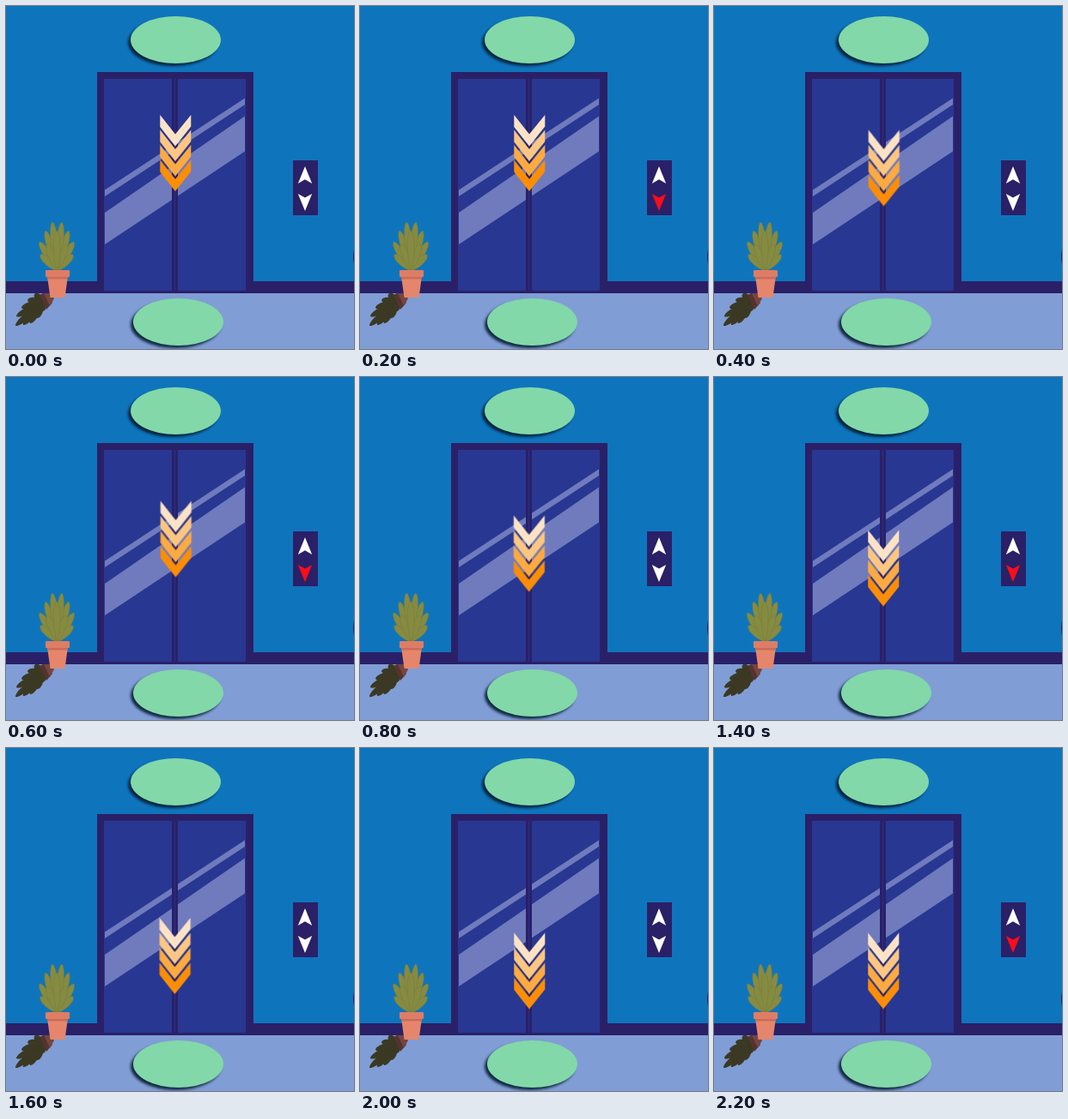
These frames come from a looping animation (405 px wide and 400 px high, 2.4 s). An HTML page:

```html
<!DOCTYPE html>
<html lang="en">
<head>
<meta charset="utf-8">
<title>Elevator going down</title>
<style>
  html, body { margin: 0; width: 100%; height: 100%; overflow: hidden; background: #0e75bd; }
  svg { display: block; width: 405px; height: 400px; }
  .dark { fill: #2a2068; }
  .door { fill: #283791; }
  .shine { fill: #707bbd; }
  .leaf { fill: #868b42; stroke: #74793a; stroke-width: .5; }
  .shade { fill: #3b3923; }
  .disc { fill: #82d8a9; }
  #chevrons { animation: descend 2400ms step-end infinite; }
  #down { fill: #fff; animation: blink 400ms step-end infinite; }
  @keyframes descend {
    0% { transform: translate(0, 0); }
    16.6667% { transform: translate(.5px, 17.5px); }
    33.3333% { transform: translate(-.4px, 34.5px); }
    50% { transform: translate(0, 51.5px); }
    66.6667% { transform: translate(-.6px, 71px); }
    83.3333% { transform: translate(0, 88.5px); }
  }
  @keyframes blink {
    0% { fill: #fff; }
    50% { fill: #fb0d1b; }
  }
</style>
</head>
<body>
<svg viewBox="0 0 405 400">
  <defs>
    <filter id="soft" x="-20%" y="-20%" width="140%" height="140%">
      <feGaussianBlur stdDeviation="1.7"/>
    </filter>
    <g id="button">
      <ellipse cx="-3" cy="3" rx="52.5" ry="27.5" fill="#06172c" opacity=".85" filter="url(#soft)"/>
      <ellipse class="disc" rx="52.5" ry="27.5"/>
    </g>
    <path id="chevron" d="M179.3 127 197 149.5 215.3 127V140.5L197 163.5 179.3 141Z"/>
  </defs>

  <rect width="405" height="400" fill="#0e75bd"/>
  <rect class="dark" y="321" width="405" height="14"/>
  <rect y="335" width="405" height="65" fill="#809dd5"/>
  <ellipse class="dark" cx="407" cy="292.5" rx="3" ry="11"/>

  <rect class="dark" x="106" y="77" width="182" height="258"/>
  <rect class="door" x="114" y="85" width="165" height="247"/>
  <path class="shine" d="M115 214.5 278 107.5V115L115 222ZM115 241 278 128.5V169.5L115 278Z"/>
  <rect class="dark" x="193" y="85" width="7" height="247"/>
  <rect class="door" x="196" y="85" width="1" height="247" opacity=".75"/>

  <rect class="dark" x="334" y="180" width="29" height="64"/>
  <path d="M348 187 356.2 207 348 202.3 339.8 207Z" fill="#fff"/>
  <path id="down" d="M348 239 356.2 219 348 223.5 339.8 219Z"/>

  <g id="shadow"></g>
  <path d="M39 337 44 334.5 54 346 47 354Z" fill="#553330"/>
  <path d="M44 335 51 335 56 341 51 350Z" fill="#75453f"/>

  <g id="plant"></g>
  <path d="M48 315H72L68.5 340H51.5Z" fill="#e5866c"/>
  <path d="M48 315H72L71.6 318.5H48.4Z" fill="#c96b57"/>
  <rect x="46" y="308" width="28" height="8" rx="1" fill="#dd7d66"/>

  <use href="#button" x="197.5" y="39.5"/>
  <use href="#button" x="200.5" y="368.5"/>

  <g id="chevrons">
    <use href="#chevron" fill="#fde3c5"/>
    <use href="#chevron" y="17.5" fill="#fdc681"/>
    <use href="#chevron" y="35" fill="#fdaa40"/>
    <use href="#chevron" y="52.5" fill="#fb8e06"/>
  </g>
</svg>
<script>
  // A leaf is a slim, round-tipped blade from (x, y) to (tx, ty).
  function leaf(group, name, x, y, tx, ty, w) {
    const dx = tx - x, dy = ty - y, len = Math.hypot(dx, dy);
    const nx = -dy / len * w, ny = dx / len * w;
    const at = (k, side) => `${x + dx * k + nx * side} ${y + dy * k + ny * side}`;
    const path = document.createElementNS("http://www.w3.org/2000/svg", "path");
    path.setAttribute("class", name);
    path.setAttribute("d",
      `M${x} ${y}C${at(.3, 1)} ${at(.92, 1.3)} ${tx} ${ty}C${at(.92, -1.3)} ${at(.3, -1)} ${x} ${y}Z`);
    document.getElementById(group).append(path);
  }

  const tips = [[39, 275], [79, 275], [40, 290], [78, 290], [46, 262], [73, 262],
                [54, 252], [65, 252], [48, 278], [70, 278], [59, 262]];
  for (const [x, y] of tips) leaf("plant", "leaf", 59.5, 309, x, y, 4.6);

  const shades = [[11, 373], [12, 362], [18, 352], [25, 343], [33, 336],
                  [20, 372], [28, 370], [36, 364], [42, 356]];
  for (const [x, y] of shades) leaf("shadow", "shade", 44, 344, x, y, 4.2);
</script>
</body>
</html>
```
